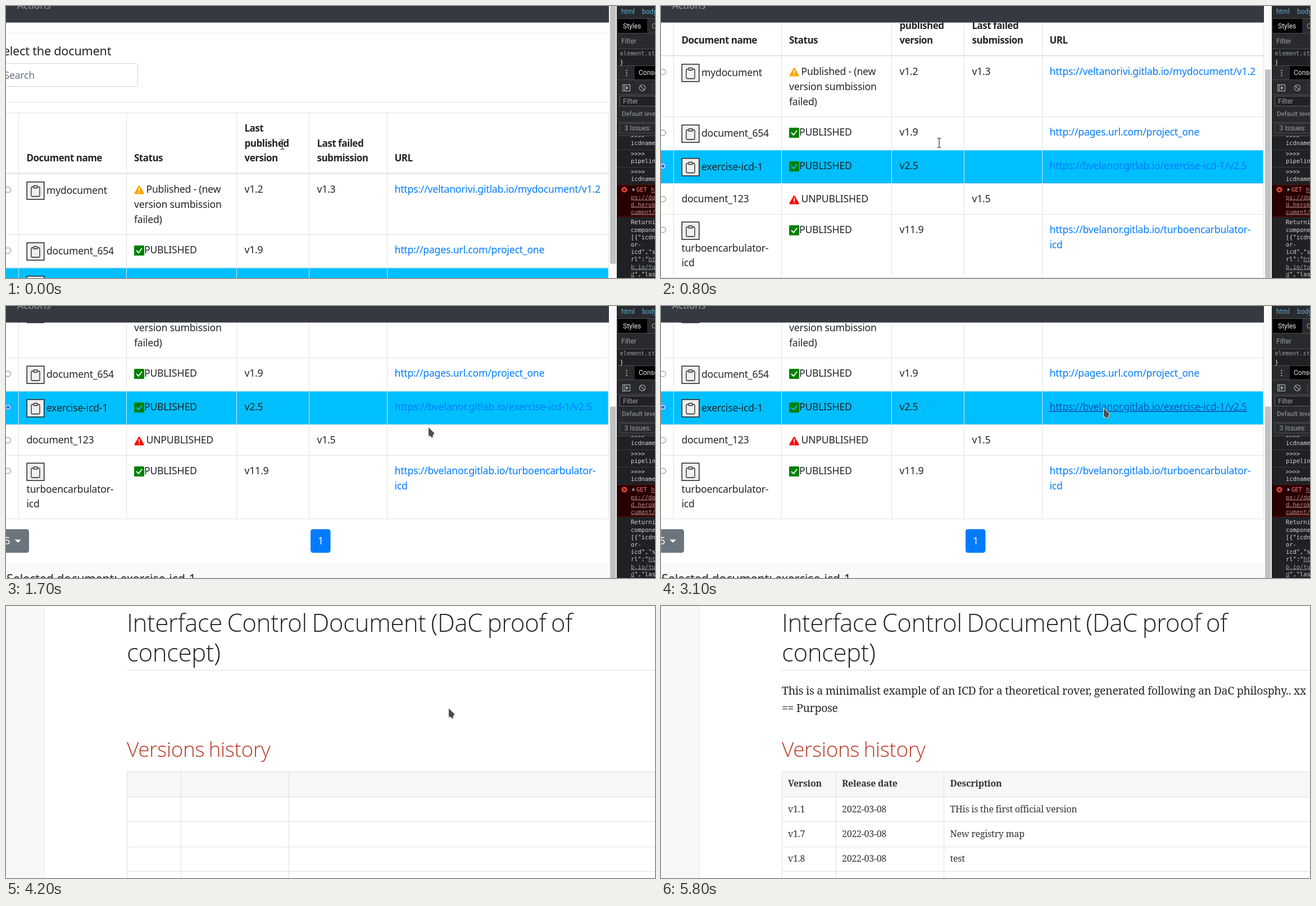
An HTML page that plays this animation: 1155 by 485 pixels, repeating every 6000 ms.

```html
<!DOCTYPE html>
<html lang="en">
<head>
<meta charset="utf-8">
<title>Document list</title>
<style>
@property --scroll { syntax: "<length>"; inherits: true; initial-value: 0px; }
html, body { margin: 0; width: 100%; height: 100%; overflow: hidden; background: #fff; }
svg { display: block; width: 1155px; height: 485px; }
text { white-space: pre; }

/* every change is a hard step */
.page, .doc, .teal, .late, .url, .cursor, .beam, .arrow, .hand { animation: 6s step-end infinite; }

.page { font: 17.6px "Noto Sans", sans-serif; letter-spacing: -.2px; fill: #212529; animation-name: scroll, leave; }
.list { transform: translateY(calc(var(--scroll) * -1)); }
.thumb { transform: translateY(calc(var(--scroll) * .63)); fill: #c1c1c1; }
.big { font-size: 21.6px; }
.th { font-size: 17px; font-weight: 700; letter-spacing: -.5px; }
.link { fill: #007bff; }
.url { animation-name: hover; }
.grid { fill: none; stroke: #dee2e6; }

.tools { font: 12px Roboto, sans-serif; letter-spacing: 0; fill: #e8eaed; }
.mono { font: 10.4px "DejaVu Sans Mono", monospace; }
.dim { fill: #9aa0a6; }
.err { fill: #ff8080; }
.u { text-decoration: underline; }

.teal { visibility: hidden; fill: #035b6d; animation-name: blank; }
.doc { visibility: hidden; font: 16px "Noto Serif", serif; fill: #333; letter-spacing: -.015em; animation-name: enter; }
.head text { font: 300 44px "Open Sans", sans-serif; letter-spacing: -.012em; word-spacing: -.05em; fill: #262626; }
.head .h2 { font-size: 37px; fill: #ba3925; }
.late { visibility: hidden; animation-name: load; }
.late text { letter-spacing: -.015em; }
.lead { font-size: 19.5px; fill: #262626; }
.b { font-weight: 700; }

.cursor { transform: translate(492px, 247px); animation-name: move; }
.beam { animation-name: beam; }
.arrow { visibility: hidden; animation-name: arrow; }
.hand { visibility: hidden; animation-name: hand; }
.arrow, .hand { fill: #4d4d4d; stroke: #fff; stroke-linejoin: round; filter: drop-shadow(0 1px 1px #0003); }

@keyframes scroll {
  8.33% { --scroll: 35px } 9.99% { --scroll: 105px } 11.66% { --scroll: 175px } 13.33% { --scroll: 210px }
  18.33% { --scroll: 225px } 19.99% { --scroll: 275px } 21.66%, to { --scroll: 315px }
}
@keyframes leave { 54.99%, to { visibility: hidden } }
@keyframes blank { 54.99% { visibility: visible } 69.99%, to { visibility: hidden } }
@keyframes enter { 69.99%, to { visibility: visible } }
@keyframes load { 73.33%, to { visibility: visible } }
@keyframes hover { 34.99%, to { fill: #0056b3; text-decoration: underline } }
@keyframes beam { 24.99%, to { visibility: hidden } }
@keyframes arrow {
  24.99% { visibility: visible } 34.99% { visibility: hidden }
  51.66% { visibility: visible } 96.66%, to { visibility: hidden }
}
@keyframes hand { 34.99% { visibility: visible } 51.66%, to { visibility: hidden } }
@keyframes move {
  1.66% { transform: translate(498px, 245px) }
  3.33% { transform: translate(495px, 244px) }
  23.33% { transform: translate(545px, 240px) }
  24.99% { transform: translate(640px, 231px) }
  26.66% { transform: translate(715px, 221px) }
  28.33% { transform: translate(751px, 215px) }
  29.99% { transform: translate(759px, 210px) }
  31.66% { transform: translate(769px, 203px) }
  33.33% { transform: translate(778px, 194px) }
  34.99% { transform: translate(785px, 185px) }
  36.66% { transform: translate(787px, 181px) }
  78.33% { transform: translate(776px, 179px) }
  79.99% { transform: translate(722px, 171px) }
  81.66% { transform: translate(612px, 152px) }
  83.33% { transform: translate(475px, 130px) }
  84.99% { transform: translate(342px, 109px) }
  86.66% { transform: translate(240px, 97px) }
  88.33% { transform: translate(187px, 93px) }
  89.99% { transform: translate(155px, 72px) }
  91.66% { transform: translate(113px, 46px) }
  93.33% { transform: translate(70px, 22px) }
  94.99%, to { transform: translate(29px, 2px) }
}
</style>
</head>
<body>
<svg viewBox="0 0 1155 485">
  <defs>
    <g id="radio"><circle cx="3.5" r="5" fill="#fff" stroke="#767676"/></g>
    <g id="clip" fill="none" stroke="#222">
      <rect x=".75" y=".75" width="30.5" height="31" fill="#efefef" stroke-width="1.5"/>
      <path d="M12 9.5H10Q8.5 9.5 8.5 11V25Q8.5 26.5 10 26.5H22Q23.5 26.5 23.5 25V11Q23.5 9.5 22 9.5H20" stroke-width="1.3"/>
      <rect x="12.5" y="7.5" width="7" height="4" rx="1" stroke-width="1.3"/>
    </g>
    <g id="check">
      <rect width="18" height="18" rx="1.5" fill="green"/>
      <path d="M4.5 9.5L8 13L13.5 5.5" fill="none" stroke="currentColor" stroke-width="1.8" stroke-linecap="round"/>
    </g>
    <g id="warn">
      <path d="M9 .5Q9.800 .5 10.200 1.200L17.500 14Q18 16 16.500 16H1.500Q0 16 .5 14L7.800 1.200Q8.200 .5 9 .5Z"/>
      <path d="M9 5.5V10" stroke="#fff" stroke-width="1.8" stroke-linecap="round"/>
      <circle cx="9" cy="13" r="1.1" fill="#fff"/>
    </g>
  </defs>

  <g class="page">
    <rect width="1087" height="485" fill="#fff"/>
    <g class="list">
      <path d="M0 48.5H1073M0 171.5H1073" stroke="#e5e5e5"/>
      <text class="big" x="-17" y="88">Select the document</text>
      <rect x="-20" y="102.5" width="254.5" height="41" rx="4.5" fill="#fff" stroke="#ced4da"/>
      <text x="-3.5" y="130" fill="#6c757d">Search</text>

      <rect y="467" width="1072" height="60" fill="#00bfff"/>
      <path class="grid" d="M0 190.5H1072M0 407.5H1072M0 467H1072M0 526.5H1072M0 581.5H1072M0 694.5H1072M22.5 190V695M214.5 190V695M410.5 190V695M539.5 190V695M678.5 190V695M1072 190V695"/>
      <path class="grid" d="M0 298.5H1072" stroke-width="2"/>

      <g class="th">
        <text x="36.5" y="277">Document name</text>
        <text x="228" y="277">Status</text>
        <text x="424.5" y="223.5">Last</text>
        <text x="424.5" y="250.5">published</text>
        <text x="424.5" y="277">version</text>
        <text x="553.5" y="250.5">Last failed</text>
        <text x="553.5" y="277">submission</text>
        <text x="691.5" y="277">URL</text>
      </g>

      <use href="#radio" y="327.5"/>
      <use href="#clip" x="36.5" y="313"/>
      <text x="72" y="335">mydocument</text>
      <use href="#warn" x="228" y="319.5" fill="orange"/>
      <text x="249.5" y="333">Published - (new</text>
      <text x="228" y="360">version sumbission</text>
      <text x="228" y="386.5">failed)</text>
      <text x="424.5" y="333">v1.2</text>
      <text x="553.5" y="333">v1.3</text>
      <text class="link" x="691.5" y="333">https://veltanorivi.gitlab.io/mydocument/v1.2</text>

      <use href="#radio" y="436"/>
      <use href="#clip" x="36.5" y="421.5"/>
      <text x="72" y="443">document_654</text>
      <use href="#check" x="228" y="427" color="#fff"/>
      <text x="246" y="441">PUBLISHED</text>
      <text x="424.5" y="441">v1.9</text>
      <text class="link" x="691.5" y="441">http://pages.url.com/project_one</text>

      <circle cx="3.5" cy="495.5" r="5" fill="#fff" stroke="#0075ff"/>
      <circle cx="3.5" cy="495.5" r="3" fill="#0075ff"/>
      <use href="#clip" x="36.5" y="481"/>
      <text x="72" y="503">exercise-icd-1</text>
      <use href="#check" x="228" y="487" color="#00bfff"/>
      <text x="246" y="501">PUBLISHED</text>
      <text x="424.5" y="501">v2.5</text>
      <text class="link url" x="691.5" y="501">https://bvelanor.gitlab.io/exercise-icd-1/v2.5</text>

      <use href="#radio" y="554.5"/>
      <text x="36.5" y="560">document_123</text>
      <use href="#warn" x="228" y="547.5" fill="red"/>
      <text x="249.5" y="560">UNPUBLISHED</text>
      <text x="553.5" y="560">v1.5</text>

      <use href="#radio" y="609"/>
      <use href="#clip" x="36.5" y="594.5"/>
      <text x="36.5" y="647.5">turboencarbulator-</text>
      <text x="36.5" y="674">icd</text>
      <use href="#check" x="228" y="601" color="#fff"/>
      <text x="246" y="614.5">PUBLISHED</text>
      <text x="424.5" y="614.5">v11.9</text>
      <text class="link" x="691.5" y="614.5">https://bvelanor.gitlab.io/turboencarbulator-</text>
      <text class="link" x="691.5" y="641.5">icd</text>

      <rect x="-20" y="713" width="61" height="42" rx="4.5" fill="#6c757d"/>
      <text x="-2.5" y="740" fill="#fff">5</text>
      <path d="M15.5 731.5H27L21.25 737Z" fill="#fff"/>
      <rect x="542" y="713" width="35.5" height="42" rx="4.5" fill="#007bff"/>
      <text x="555" y="740" fill="#fff">1</text>
      <rect y="773" width="1073" height="60" fill="#f8f9fa"/>
      <text class="big" x="1" y="809">Selected document: exercise-icd-1</text>
    </g>
    <rect width="1073" height="29.5" fill="#343a40"/>
    <text x="20" y="5" fill="#9a9da0">Actions</text>
    <rect x="1073" width="14" height="485" fill="#fafafa"/>
    <rect class="thumb" x="1075" y="-19" width="10.5" height="478.5"/>

    <g class="tools">
      <rect x="1087" width="68" height="485" fill="#202124"/>
      <path d="M1088 0H1155V76H1088ZM1088 106H1155V231H1088Z" fill="#292a2d"/>
      <path d="M1089 23H1141V48H1089ZM1119 107H1155V131H1119Z" fill="#000"/>
      <path d="M1088 22.5H1155M1088 48.5H1155M1088 76.5H1155M1088 106.5H1155M1088 131.5H1155M1088 157.5H1155M1088 207.5H1155M1088 231.5H1155M1150.5 138V154" stroke="#4a4c50"/>
      <text x="1095" y="14" fill="#5db0d7">html</text>
      <text x="1132" y="14" fill="#5db0d7">body</text>
      <text x="1098" y="40">Styles</text>
      <text class="dim" x="1149" y="40">Computed</text>
      <text class="dim" x="1095" y="67">Filter</text>
      <g class="mono">
        <text class="dim" x="1092.5" y="88">element.style {</text>
        <text x="1092.5" y="104">}</text>
      </g>
      <g class="dim">
        <circle cx="1104.5" cy="115" r="1.3"/><circle cx="1104.5" cy="119.5" r="1.3"/><circle cx="1104.5" cy="124" r="1.3"/>
        <path d="M1103 142.5L1108.5 146L1103 149.5Z"/>
      </g>
      <text x="1126" y="123">Console</text>
      <g fill="none" stroke="#9aa0a6" stroke-width="1.3">
        <path d="M1097.5 140.5H1110.5V151.5H1097.5ZM1100.5 140.5V151.5"/>
        <circle cx="1132.5" cy="146" r="5.3"/><path d="M1128.8 142.3L1136.2 149.7"/>
      </g>
      <rect x="1092.5" y="160.5" width="70" height="18" fill="#202124" stroke="#5f6368"/>
      <text class="dim" x="1098" y="174">Filter</text>
      <text class="dim" x="1096" y="196" font-size="11.6">Default levels</text>
      <rect x="1092.5" y="209.5" width="70" height="17" rx="2" fill="none" stroke="#4a4c50"/>
      <text class="dim" x="1100.5" y="222">3 Issues:</text>

      <rect x="1088" y="320" width="67" height="55" fill="#290000"/>
      <path d="M1088 256.5H1155M1088 287.5H1155" stroke="#3a3b3e"/>
      <path d="M1088 319.5H1155M1088 375.5H1155" stroke="#5c0000"/>
      <g class="mono" fill="#d5d6d8">
        <svg x="1088" y="232" width="67" height="6"><text x="24" y="3">&gt;&gt;&gt;&gt;</text></svg>
        <text x="1112" y="248">icdname</text>
        <text x="1112" y="267">&gt;&gt;&gt;&gt;</text>
        <text x="1112" y="280">pipeline</text>
        <text x="1112" y="299">&gt;&gt;&gt;&gt;</text>
        <text x="1112" y="312">icdname</text>
        <g class="err">
          <circle cx="1100.5" cy="327.5" r="5" fill="#e8453c"/>
          <path d="M1098.5 325.5L1102.5 329.5M1102.5 325.5L1098.5 329.5" stroke="#290000" stroke-width="1.2"/>
          <path d="M1115 324.5L1119.5 327.5L1115 330.5Z" fill="#9aa0a6"/>
          <text x="1122" y="331">GET</text>
          <g class="u" fill="#b98a8a">
            <text x="1148" y="331">htt</text>
            <text x="1112" y="344.5">ps://doc</text>
            <text x="1112" y="357.5">d.heroku</text>
            <text x="1112" y="370.5">cument/</text>
          </g>
        </g>
        <text x="1112" y="389">Returning</text>
        <text x="1112" y="402.5">component</text>
        <text x="1112" y="415.5">[{"icdname</text>
        <text x="1112" y="428.5">or-</text>
        <text x="1112" y="441.5">icd","st</text>
        <text x="1112" y="454.5">rl":"<tspan class="u dim">https</tspan></text>
        <text x="1112" y="468.5" class="u dim">b.io/tur</text>
        <text x="1112" y="481.5"><tspan class="u dim">d</tspan>","last</text>
      </g>
    </g>
  </g>

  <rect class="teal" width="1155" height="485"/>

  <g class="doc">
    <rect width="1155" height="485" fill="#fff"/>
    <rect width="68" height="485" fill="#f8f8f8"/>
    <path d="M68.5 0V485" stroke="#e7e7e9"/>
    <g class="head">
      <text x="215" y="46">Interface Control Document (DaC proof of</text>
      <text x="215" y="99">concept)</text>
      <text class="h2" x="215" y="269">Versions history</text>
    </g>
    <rect x="215" y="296" width="940" height="44" fill="#f7f7f7"/>
    <path d="M215 114.5H1155M215 295.5H1155M215 340.5H1155M215 384.5H1155M215 429.5H1155M215 473.5H1155M215.5 296V485M311.5 296V485M503.5 296V485" fill="none" stroke="#dedede"/>
    <g class="late">
      <g class="lead">
        <text x="215" y="157.5">This is a minimalist example of an ICD for a theoretical rover, generated following an DaC philosphy.. xx</text>
        <text x="215" y="188.5">== Purpose</text>
      </g>
      <g class="b">
        <text x="226" y="322">Version</text>
        <text x="322" y="322">Release date</text>
        <text x="514.5" y="322">Description</text>
      </g>
      <text x="226" y="368">v1.1</text>
      <text x="322" y="368">2022-03-08</text>
      <text x="514.5" y="368">THis is the first official version</text>
      <text x="226" y="412">v1.7</text>
      <text x="322" y="412">2022-03-08</text>
      <text x="514.5" y="412">New registry map</text>
      <text x="226" y="456">v1.8</text>
      <text x="322" y="456">2022-03-08</text>
      <text x="514.5" y="456">test</text>
    </g>
  </g>

  <g class="cursor">
    <path class="beam" d="M-3.5 -8.5H-1.5L0 -7.5L1.5 -8.5H3.5M0 -7.5V7.5M-3.5 8.5H-1.5L0 7.5L1.5 8.5H3.5" fill="none" stroke="#333" stroke-width="1.2"/>
    <path class="arrow" d="M.5 .5V17H4L6.5 20L9.5 18.5L9 15.5L12 12Z"/>
    <path class="hand" d="M-1 2Q1 -1.5 3 2V8L11 9.5Q13 10 13 12L11.5 21H1L-6.5 14Q-8 11 -5 11L-1 13.5Z"/>
  </g>
</svg>
</body>
</html>
```
